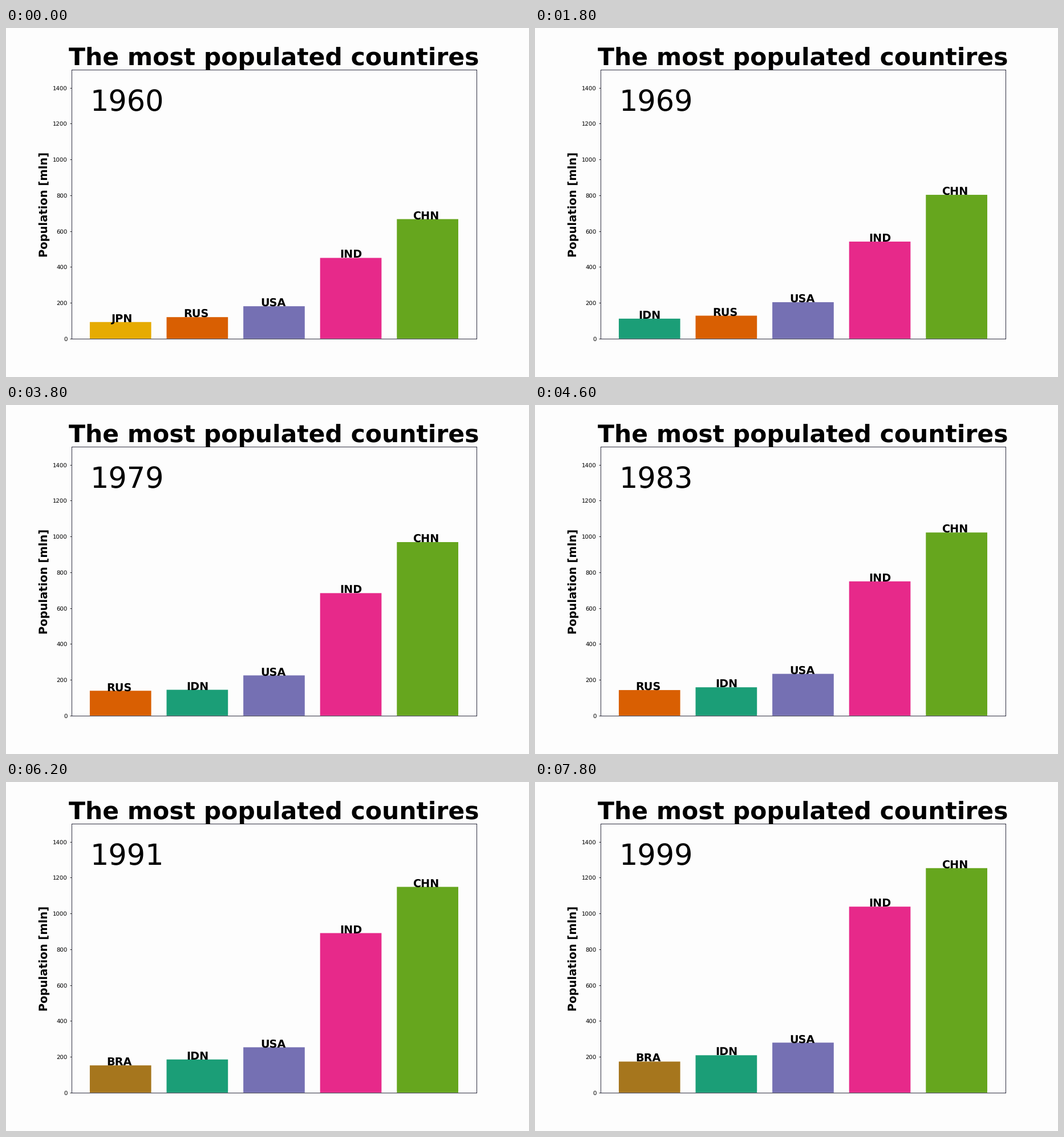
These frames come from a looping animation (917x611 px, 8 s). A matplotlib script:

```python
import matplotlib.pyplot as plt
import numpy as np
from matplotlib.animation import FuncAnimation

W, H, DPI = 917, 611, 64
PX = 72 / DPI  # points per pixel
BG, FRAME = "#fdfdfd", "#18182c"
FIRST, LAST = 1960, 1999

# Bar colour and population (millions) at evenly spaced moments
COUNTRIES = {
    "JPN": ("#e6ab02", [92.5, 108.9, 121.5, 126.6]),
    "BRA": ("#a6761d", [72.2, 102.3, 138, 173.2]),
    "RUS": ("#d95f02", [119.9, 132.4, 144.9, 147.2]),
    "IDN": ("#1b9e77", [87.8, 124, 168.4, 208.6]),
    "USA": ("#7570b3", [180.7, 211.9, 240.1, 279]),
    "IND": ("#e7298a", [450.5, 594, 801, 1038]),
    "CHN": ("#66a61e", [667, 745, 882, 975, 1067, 1172, 1253]),
}


def growth(values):
    """Smooth curve on [0, 1] through evenly spaced values."""
    t = np.linspace(0, 1, len(values))
    return np.poly1d(np.polyfit(t, values, len(values) - 1))


CURVES = {code: growth(values) for code, (_, values) in COUNTRIES.items()}

plt.rcParams["font.family"] = "DejaVu Sans"
plt.rcParams["text.hinting"] = "none"

fig = plt.figure(figsize=(W / DPI, H / DPI), dpi=DPI, facecolor=BG)
ax = fig.add_axes([0.125, 0.11, 0.775, 0.77], facecolor=BG)
ax.set_xlim(-0.64, 4.64)
ax.set_ylim(0, 1500)
ax.set_xticks([])
ax.set_yticks(range(0, 1401, 200))
ax.tick_params(axis="y", length=3.4 * PX, width=0.8 * PX, pad=3.4 * PX,
               labelsize=10.19 * PX)
for spine in ax.spines.values():
    spine.set(linewidth=0.9 * PX, edgecolor=FRAME)


def heading(x, y, text, size, **kw):
    """Bold centred text whose baseline sits at pixel (x, y) from the top left."""
    fig.text(x / W, 1 - y / H, text, fontsize=size * PX, weight="bold",
             ha="center", va="baseline", **kw)


heading(469.7, 65.5, "The most populated countires", 42.45)
heading(72.4, 308.6, "Population [mln]", 19.5, rotation=90,
        rotation_mode="anchor")

year_text = ax.text(-0.4, 1272, "", fontsize=50.9 * PX)
bars = ax.bar(range(5), [0] * 5, width=0.8, linewidth=0, snap=False)
labels = [ax.text(i + 0.15, 0, "", fontsize=19.3 * PX, weight="bold",
                  ha="right", va="baseline") for i in range(5)]


def top_five(t):
    totals = [(curve(t), code) for code, curve in CURVES.items()]
    return sorted(totals)[-5:]


def update(i):
    year_text.set_text(str(FIRST + i))
    ranking = top_five(i / (LAST - FIRST))
    for bar, label, (total, code) in zip(bars, labels, ranking):
        bar.set_height(total)
        bar.set_facecolor(COUNTRIES[code][0])
        label.set_text(code)
        label.set_y(total)
    return [year_text, *bars, *labels]


anim = FuncAnimation(fig, update, frames=LAST - FIRST + 1, interval=200,
                     repeat=True, repeat_delay=0, blit=False)
plt.show()
```
